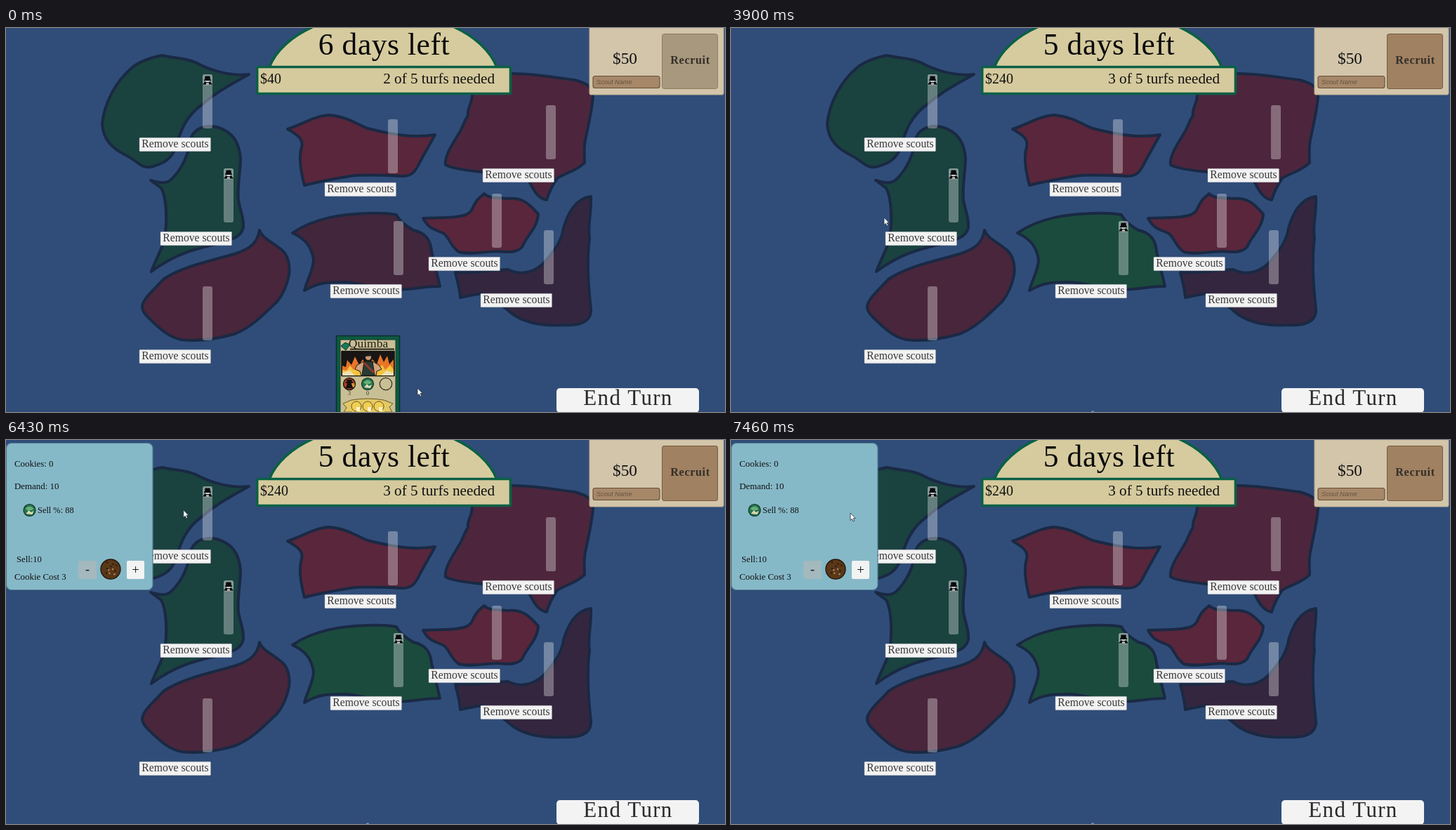
An HTML page with a canvas for the animation above (7.52 s loop, 1024 px wide and 547 px high).

```html
<!DOCTYPE html>
<html lang="en">
<head>
<meta charset="utf-8">
<title>Turf map</title>
<style>
html, body { margin: 0; width: 100%; height: 100%; overflow: hidden; background: #304d79; }
canvas { display: block; width: 1024px; height: 547px; }
</style>
</head>
<body>
<canvas id="stage"></canvas>
<script>
const LOOP = 7520, W = 1024, H = 547;
const GRAB = 480, DROP = 1500, NEXT_DAY = 3080;
const SERIF = '"Liberation Serif", serif', SANS = '"Liberation Sans", sans-serif';
const canvas = document.getElementById('stage');
const ratio = window.devicePixelRatio || 1;
canvas.width = W * ratio;
canvas.height = H * ratio;
const c = canvas.getContext('2d');

// Each turf: fill, slot corner, outline
const turfs = [
  ['#1a423f', 280, 66, 'M346 66C320 69 292 61 270 49C255 42 237 43 222 39C202 43 190 48 180 56C155 77 140 108 137 136C138 160 152 172 172 182C188 190 192 200 206 198C222 194 232 189 239 176C246 160 250 130 278 110C295 95 310 86 346 66Z'],
  ['#1a423f', 310, 200, 'M206 217C220 221 228 222 235 216C252 200 260 180 264 155C270 142 285 138 300 141C325 148 332 165 334 185C334 205 329 225 331 245C334 262 339 270 338 284C334 300 320 300 308 306C270 314 240 322 207 347C213 330 222 315 225 303C231 275 228 240 221 228Z'],
  ['#49263b', 280, 368, 'M361 288C365 300 380 305 390 314C402 322 405 338 403 352C400 368 394 380 386 390C372 402 352 426 325 436C300 443 275 447 250 444C235 441 225 433 216 425C203 413 193 405 194 396C197 383 212 372 224 358C250 340 290 332 325 322C350 314 358 305 361 288Z'],
  ['#5a263b', 544, 130, 'M401 144C420 138 440 125 460 124C490 127 500 138 515 143C550 152 580 157 611 152C603 167 595 180 590 190C583 205 578 211 565 211C540 210 510 208 490 211C465 215 445 219 425 224C420 205 416 185 421 170C424 158 415 152 401 144Z'],
  ['#42263c', 552, 275, 'M408 292C440 270 480 265 515 264C535 263 545 264 556 266C560 275 570 282 580 288C600 292 605 305 606 318C610 335 614 350 618 368C590 368 570 375 540 372C515 368 500 362 480 362C460 362 445 362 425 374C428 360 438 345 438 330C435 310 425 300 408 292Z'],
  ['#4d263d', 769, 110, 'M668 85L719 65C750 64 790 72 810 74C825 78 838 85 836 97C835 115 830 135 826 155C822 170 824 180 824 192C810 205 795 207 785 214C778 224 773 235 770 245C758 243 752 232 746 220C735 205 715 210 690 207C665 203 640 202 626 195C624 180 640 160 648 145C655 130 655 128 658 125C656 115 664 108 664 95Z'],
  ['#35263f', 766, 288, 'M833 240C834 265 828 280 831 300C827 330 829 365 833 400C834 420 815 424 795 423C765 425 740 420 722 408C710 398 695 385 678 378C665 380 655 382 647 384C646 370 642 358 640 348C670 350 690 345 715 344C735 354 757 347 770 330C785 312 792 300 794 285C800 265 810 243 833 240Z'],
  ['#5a263b', 692, 236, 'M594 271C620 270 640 271 655 266C665 262 664 255 668 250C672 242 677 240 681 236C688 243 700 242 715 243C735 241 745 250 758 265C757 285 742 295 735 312C728 320 715 320 700 318C680 319 660 323 645 319C634 312 632 300 624 293C613 287 603 288 594 271Z']
].map(([fill, x, y, d]) => ({ fill, x, y, path: new Path2D(d) }));

// Pointer stops: time, x, y
const stops = [
  [0, 586, 513], [120, 586, 513], [480, 517, 496], [620, 517, 490], [1050, 467, 340],
  [1200, 467, 340], [1500, 490, 335], [1620, 490, 335], [2250, 905, 533], [2470, 908, 535],
  [2750, 908, 535], [3300, 560, 400], [3880, 218, 270], [3920, 218, 270], [4150, 262, 250],
  [4550, 265, 245], [4750, 240, 130], [5050, 230, 110], [5400, 398, 73], [5500, 400, 73],
  [5900, 660, 80], [6200, 420, 90], [6450, 250, 100], [6800, 261, 209], [6860, 261, 209],
  [7250, 180, 115], [7460, 170, 104]
];

// Popups: turf index, start, end
const popups = [[4, 900, 1750], [1, 4000, 4660], [0, 4660, 5230], [0, 6400, LOOP]];

const clamp = v => Math.min(1, Math.max(0, v));
const ramp = (t, from, to) => clamp((t - from) / (to - from));

function pointer(t) {
  const i = stops.findIndex(s => s[0] > t);
  if (i < 0) return stops[stops.length - 1].slice(1);
  const [a, x, y] = stops[i - 1], [b, nx, ny] = stops[i];
  const k = ramp(t, a, b), e = k * k * (3 - 2 * k);
  return [x + (nx - x) * e, y + (ny - y) * e];
}

function text(str, x, y, size, { align = 'left', color = '#111', style = '', family = SERIF, gap = 0 } = {}) {
  c.font = `${style} ${size}px ${family}`;
  c.letterSpacing = gap + 'px';
  c.textAlign = align;
  c.fillStyle = color;
  c.fillText(str, x, y);
}

function paint(path, fill, stroke, width = 1) {
  if (fill) { c.fillStyle = fill; c.fill(path); }
  if (stroke) { c.strokeStyle = stroke; c.lineWidth = width; c.stroke(path); }
}

function box(x, y, w, h, r, fill, stroke, width) {
  const p = new Path2D();
  p.roundRect(x, y, w, h, r);
  paint(p, fill, stroke, width);
}

function disc(x, y, r, fill, stroke, width) {
  const p = new Path2D();
  p.arc(x, y, r, 0, Math.PI * 2);
  paint(p, fill, stroke, width);
}

const shape = (d, fill, stroke, width) => paint(new Path2D(d), fill, stroke, width);

function at(x, y, draw) {
  c.save();
  c.translate(x, y);
  draw();
  c.restore();
}

function scout(x, y) {
  at(x, y, () => {
    box(0, 0, 14, 16, 3, 'rgba(255,255,255,.22)');
    shape('M3.5 2.5H10.5L11 8H3Z', '#080a0c');
    box(4, 7, 6, 4, 1, '#c9ccd0');
    shape('M2 7.5Q7 5.5 12 7.5V9H2Z', '#080a0c');
    shape('M0 14.5L3.5 10Q7 13 10.5 10L14 14.5Z', '#080a0c');
    box(5, 12.5, 4, 2, 0, '#d8d8d8');
  });
}

function thiefIcon(x, y, r) {
  at(x, y, () => {
    c.scale(r / 10, r / 10);
    disc(0, 0, 9.5, '#a3402a', '#151010', 1.4);
    disc(5, 2, 3.5, '#d79a35');
    shape('M-4 -7H4V-3H6V-1H3L6 7H-6L-3 -1H-6V-3H-4Z', '#15100f');
  });
}

function sellIcon(x, y) {
  disc(x, y, 8.5, '#25754f', '#123028', 1.2);
  shape(`M${x - 6} ${y - 2}q6 -7 12 0l-3 2h-6Z`, '#66b077');
  shape(`M${x - 5} ${y + 5}l4 -5 3 3 4 -2 -2 5Z`, '#e2d8b0');
}

function card(x, y) {
  at(x, y, () => {
    box(0.5, 0.5, 90, 116, 1, '#0b5b40', '#0c2f2c', 1.5);
    box(6, 6, 79, 105, 0, '#c9bf95', '#17382e', 1);
    text('Quimba', 46, 17, 17.5, { align: 'center', color: '#222019' });
    shape('M13 10L20 13L14 21L7 15Z', '#17785a', '#0c3b2d', 1);
    box(20, 18.5, 63, 2, 0, '#222019');
    box(8, 22.5, 75, 35, 0, '#181514', '#111', 1.5);
    shape('M9 57V43L14 45L16 35L22 42L27 30L33 42L38 34L44 44L52 34L58 41L63 27L68 38L73 29L76 41L82 34V57Z', '#e87528');
    shape('M9 57V49L15 50L20 43L25 49L32 46H60L66 42L70 49L77 42L82 49V57Z', '#f5c33e');
    shape('M9 57V53L20 50L27 57ZM64 57L72 50L82 53V57Z', '#eee0b5');
    shape('M40 37L30 42L27 48L34 51L36 57H57L58 51L65 48L61 42L52 37Z', '#d2a47b', '#211a14', 1);
    shape('M40 37H52L55 57H37Z', '#293c32', '#141a17', 1);
    shape('M40 39L54 53', null, '#92392d', 3);
    disc(46, 31, 4.5, '#c89773', '#211a14', 1);
    shape('M40 30L42 25H50L52 29Z', '#191b19');
    thiefIcon(19, 69, 9);
    sellIcon(45, 69);
    disc(71, 69, 8.7, null, '#37352b', 1.3);
    text('3', 19, 85, 8, { align: 'center', color: '#37352b' });
    text('0', 45, 85, 8, { align: 'center', color: '#37352b' });
    shape('M10 97L22 92Q46 88 68 92L81 97L76 102L80 109H69V112H23V109H11L15 103Z', '#e3c964', '#66562a', 1);
    for (const dx of [29, 45, 61]) {
      disc(dx, 101, 7, '#f0cf55', '#6d5722', 1);
      box(dx, 102, 5, 6, 0, '#fff2ca');
    }
  });
}

function popup(turf, owned) {
  at(turf.x - 280, turf.y - 62, () => {
    box(0.5, 0.5, 208.5, 209, 7, owned ? '#86b9c8' : '#b2a781', owned ? '#507f91' : '#6d674f', 1.2);
    if (!owned) {
      thiefIcon(44.5, 91, 10);
      text('Power %: 0', 56, 96, 14.8);
      return;
    }
    text('Cookies: 0', 12, 34, 12.9);
    text('Demand: 10', 12, 66, 12.9);
    sellIcon(33.5, 96);
    text('Sell %: 88', 45, 100, 12.4);
    text('Sell:10', 15, 170, 12.7);
    text('Cookie Cost 3', 12, 195, 12.9);
    box(103, 168, 26, 26, 2, '#a3b9be');
    text('-', 116, 186, 18, { align: 'center' });
    box(172, 168, 25, 26, 2, '#f2f3f3');
    text('+', 184.5, 187, 19, { align: 'center' });
    disc(149, 180, 14, '#593819', '#251509', 1.4);
    for (let i = 0; i < 11; i++) {
      const r = 3 + (i * 5) % 9, x = 149 + Math.cos(i * 2.4) * r, y = 180 + Math.sin(i * 2.4) * r;
      disc(x, y, 1.2, i % 3 ? '#2e1b0b' : '#b78b59');
    }
  });
}

function map(t) {
  c.lineJoin = 'round';
  turfs.forEach((turf, i) => {
    const fill = i === 4 && t >= NEXT_DAY ? '#1b4b3c' : turf.fill;
    paint(turf.path, fill, '#1a2944', 4);
  });
  turfs.forEach(({ x, y }, i) => {
    box(x, y, 14, 77, 3, 'rgba(255,255,255,.32)');
    if (i < 2 || (i === 4 && t >= DROP)) scout(x, y);
    box(x - 90, y + 90.3, 101.5, 19.4, 1, '#f2f2f2', 'rgba(150,155,165,.5)', 0.8);
    text('Remove scouts', x - 39, y + 104, 15.7, { align: 'center', color: '#383838' });
  });
}

function header(t) {
  const late = t >= NEXT_DAY;
  shape('M375 56C384 32 408 11 438 -2H637C666 11 690 32 699 56Z', '#d6cb9f', '#0b6045', 3.6);
  box(357.7, 55.5, 360.8, 38, 2, '#d5ca9d', '#0b6045', 3.6);
  text(`${late ? 5 : 6} days left`, 538.5, 38, 43.5, { align: 'center', color: '#090909', gap: 0.55 });
  text(late ? '$240' : '$40', 362, 79, 20);
  text(`${late ? 3 : 2} of 5 turfs needed`, 696, 79, 21.2, { align: 'right' });
}

function recruit(t) {
  box(831, -4, 191, 99, 2, '#d2c5aa', '#b8aa8d', 1);
  box(934.5, 8.5, 79, 78, 3, '#a8987d', '#8e7d62', 1);
  c.globalAlpha = ramp(t, 3190, 3290);
  box(934.5, 8.5, 79, 78, 3, '#a08162', '#765b40', 1);
  c.globalAlpha = 1;
  box(836, 68.5, 95, 17, 3, '#a68869', '#654e38', 1.1);
  text('Scout Name', 841, 80, 9.2, { style: 'italic', family: SANS, color: '#66523e' });
  text('$50', 881.5, 51, 23.3, { align: 'center' });
  text('Recruit', 974.5, 51, 16.2, { align: 'center', style: 'bold', color: '#343029', gap: 0.6 });
}

function endTurn(t) {
  const pressed = t > 2560 && t < 2700;
  const hover = t > 2180 && t < 2850;
  box(784, 513, 203, 35, 5, pressed ? '#c8c8c8' : hover ? '#ededed' : '#f3f3f3');
  text('End Turn', 886, 537, 31, { align: 'center', color: '#292929', gap: 1.3 });
}

// Darkening that grows with the square of the depth
function shade(t) {
  const k = ramp(t, 6500, 6680) * (1 - ramp(t, 6950, 7150));
  if (!k) return;
  const g = c.createLinearGradient(0, 190, 0, H);
  for (let p = 0; p <= 1; p += 0.125) g.addColorStop(p, `rgba(0,0,0,${0.3 * k * p * p})`);
  c.fillStyle = g;
  c.fillRect(0, 0, W, H);
}

function draw(t) {
  const [px, py] = pointer(t);
  c.setTransform(ratio, 0, 0, ratio, 0, 0);
  c.fillStyle = '#304d79';
  c.fillRect(0, 0, W, H);
  map(t);
  header(t);
  recruit(t);
  endTurn(t);
  if (t >= GRAB) box(513, 545.5, 4, 2, 1, '#8193ac');
  if (t < DROP) {
    const k = ramp(t, GRAB, GRAB + 60);
    card(470 + (px - 517) * k, 438 + (py - 496) * k);
  }
  const open = popups.find(([, from, to]) => t >= from && t < to);
  if (open) popup(turfs[open[0]], open[0] < 2);
  shade(t);
  at(px, py, () => shape('M0 0V10.5L2.4 8.3L4 12L5.8 11.2L4.2 7.6H7.2Z', '#fff', '#222c3c', 0.8));
}

const start = performance.now();
function tick() {
  draw((performance.now() - start) % LOOP);
  requestAnimationFrame(tick);
}
tick();
</script>
</body>
</html>
```
